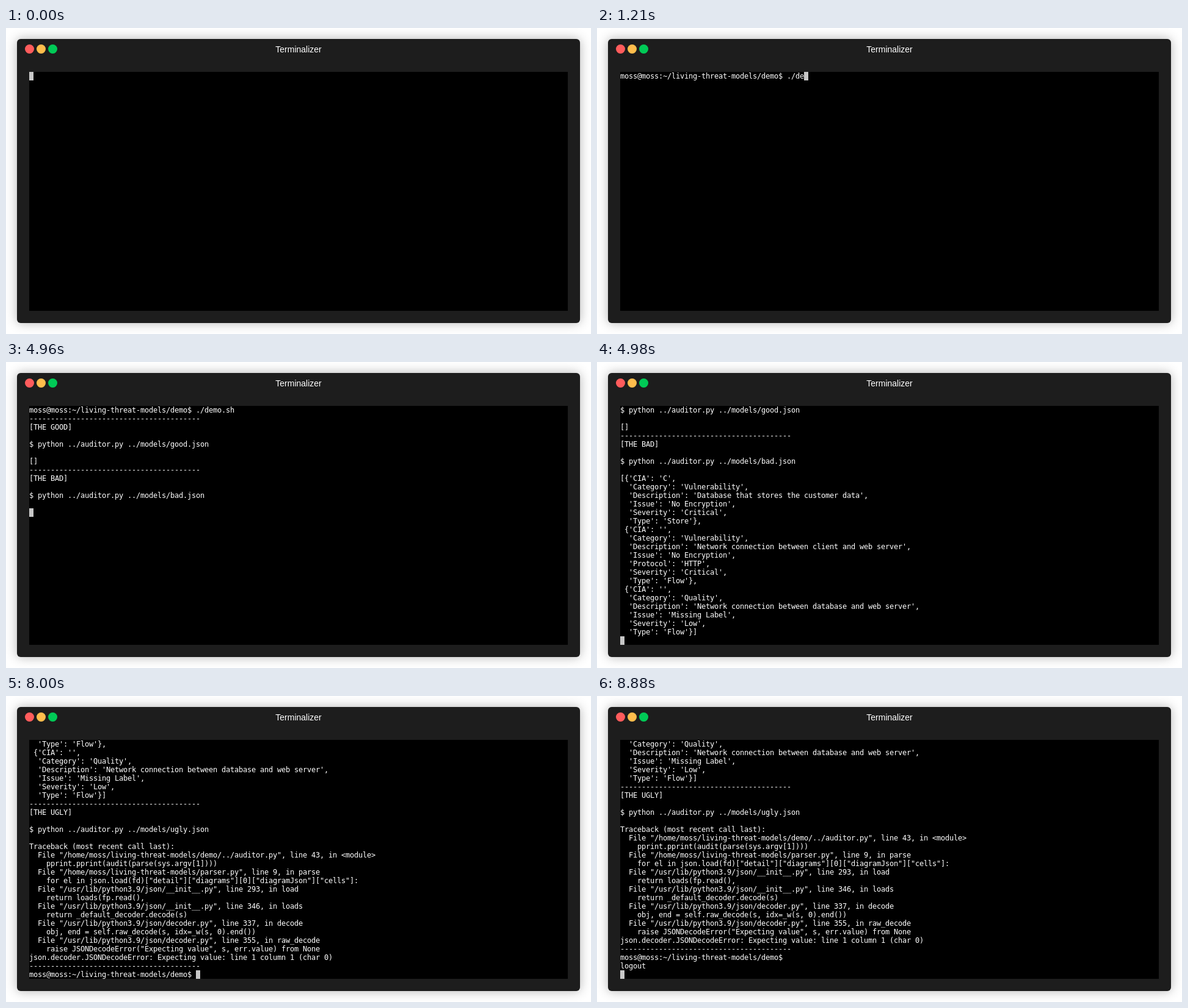
Animation, 958 px wide and 502 px high, one loop 9.22 s. Source, as an HTML page:

```html
<!DOCTYPE html>
<html lang="en">
<head>
<meta charset="utf-8">
<title>Terminal demo</title>
<style>
  html, body { margin: 0; width: 100%; height: 100%; overflow: hidden; background: #fff; }
  .window {
    position: absolute; left: 18px; top: 18px; width: 922px; height: 466px;
    border-radius: 6px; background: #1d1d1d; box-shadow: 0 0 18px rgba(0, 0, 0, .3);
  }
  .button { position: absolute; top: 9px; width: 15px; height: 15px; border-radius: 50%; }
  .close { left: 13px; background: #ff5c5c; }
  .minimize { left: 32px; background: #ffbd4c; }
  .zoom { left: 51px; background: #00ca56; }
  .title {
    position: absolute; top: 9px; width: 100%; text-align: center; color: #fff;
    font: 14px/16px "Liberation Sans", Arial, sans-serif;
  }
  .screen {
    position: absolute; left: 20px; top: 54px; width: 882px; height: 392px;
    overflow: hidden; background: #000;
  }
  #text {
    margin: 0; color: #fff; white-space: pre;
    font: 12px/14px "DejaVu Sans Mono", monospace;
    letter-spacing: calc(7px - 1ch); /* snap glyphs to the cell grid */
  }
  #cursor { position: absolute; left: 0; top: 0; width: 7px; height: 14px; background: #c7c7c7; }
</style>
</head>
<body>
<div class="window">
  <div class="button close"></div>
  <div class="button minimize"></div>
  <div class="button zoom"></div>
  <div class="title">Terminalizer</div>
  <div class="screen"><pre id="text"></pre><div id="cursor"></div></div>
</div>
<script>
const LOOP = 9220, ROWS = 28, CELL_W = 7, CELL_H = 14;
const prompt = 'moss@moss:~/living-threat-models/demo$ ';
const rule = '-'.repeat(40) + '\n';
const header = name =>
  `${rule}[THE ${name.toUpperCase()}]\n\n$ python ../auditor.py ../models/${name}.json\n\n`;

const findings = `[{'CIA': 'C',
  'Category': 'Vulnerability',
  'Description': 'Database that stores the customer data',
  'Issue': 'No Encryption',
  'Severity': 'Critical',
  'Type': 'Store'},
 {'CIA': '',
  'Category': 'Vulnerability',
  'Description': 'Network connection between client and web server',
  'Issue': 'No Encryption',
  'Protocol': 'HTTP',
  'Severity': 'Critical',
  'Type': 'Flow'},
 {'CIA': '',
  'Category': 'Quality',
  'Description': 'Network connection between database and web server',
  'Issue': 'Missing Label',
  'Severity': 'Low',
  'Type': 'Flow'}]
`;

const traceback = `Traceback (most recent call last):
  File "/home/moss/living-threat-models/demo/../auditor.py", line 43, in <module>
    pprint.pprint(audit(parse(sys.argv[1])))
  File "/home/moss/living-threat-models/parser.py", line 9, in parse
    for el in json.load(fd)["detail"]["diagrams"][0]["diagramJson"]["cells"]:
  File "/usr/lib/python3.9/json/__init__.py", line 293, in load
    return loads(fp.read(),
  File "/usr/lib/python3.9/json/__init__.py", line 346, in loads
    return _default_decoder.decode(s)
  File "/usr/lib/python3.9/json/decoder.py", line 337, in decode
    obj, end = self.raw_decode(s, idx=_w(s, 0).end())
  File "/usr/lib/python3.9/json/decoder.py", line 355, in raw_decode
    raise JSONDecodeError("Expecting value", s, err.value) from None
json.decoder.JSONDecodeError: Expecting value: line 1 column 1 (char 0)
`;

// [time in ms, output appended to the terminal]
const steps = [
  [0, ''],
  [670, prompt],
  [890, './'],
  [1040, 'd'],
  [1210, 'e'],
  [1260, 'm'],
  [1420, 'o'],
  [1520, '.sh '],
  [1940, '\n' + header('good')],
  [1960, '[]\n'],
  [4960, header('bad')],
  [4980, findings],
  [7980, header('ugly')],
  [8000, traceback + rule + prompt],
  [8880, '\nlogout\n'],
];

const text = document.getElementById('text');
const cursor = document.getElementById('cursor');
let shown = -1;

function show(count) {
  const output = steps.slice(0, count).map(step => step[1]).join('');
  const lines = output.split('\n').slice(-ROWS);
  const x = lines[lines.length - 1].length * CELL_W;
  const y = (lines.length - 1) * CELL_H;
  text.textContent = lines.join('\n');
  cursor.style.transform = `translate(${x}px, ${y}px)`;
}

const start = performance.now();
function tick() {
  const time = (performance.now() - start) % LOOP;
  const count = steps.filter(step => step[0] <= time).length;
  if (count !== shown) show(shown = count);
  requestAnimationFrame(tick);
}
tick();
</script>
</body>
</html>
```
